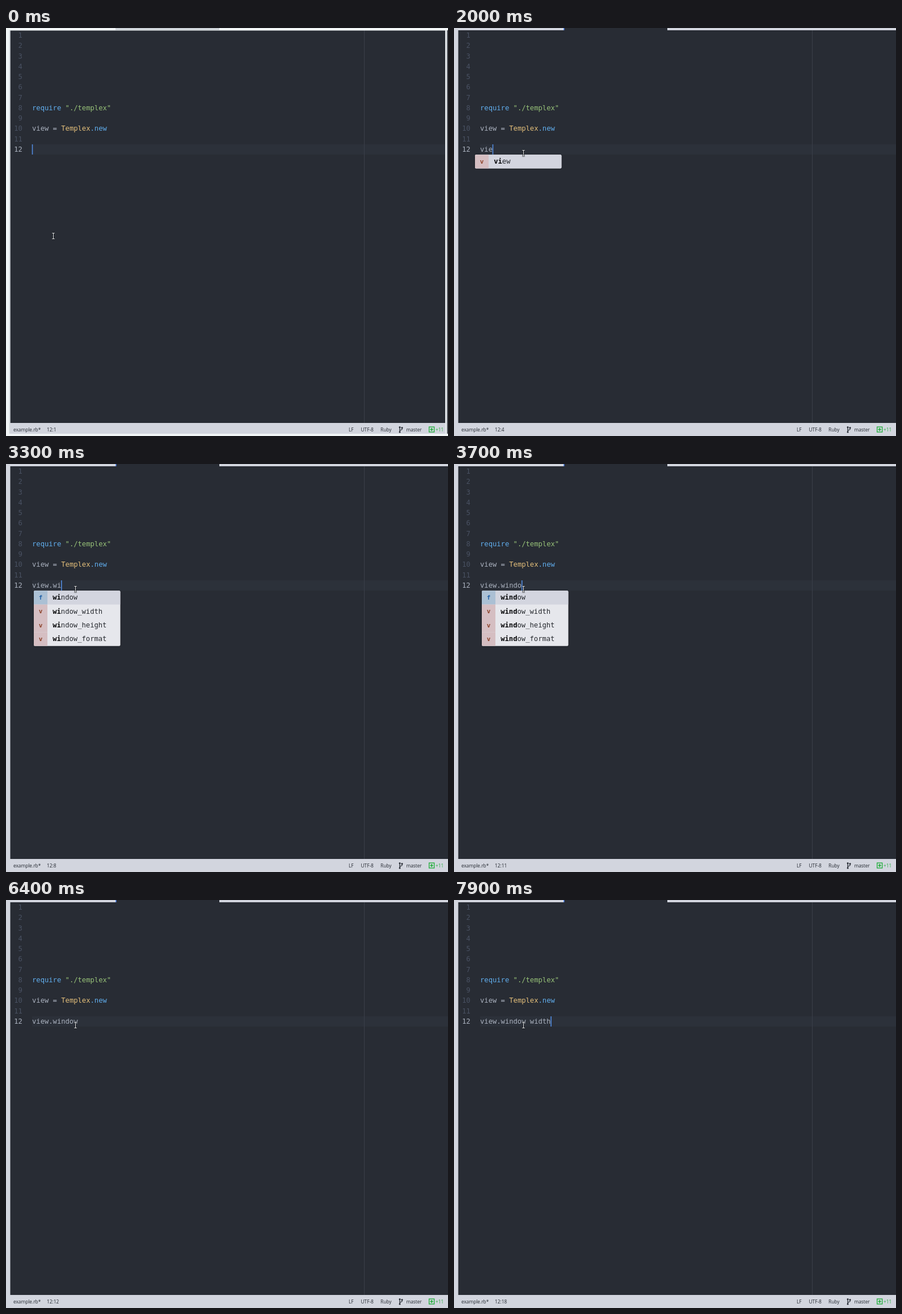
An HTML page with a canvas for the animation above (8 s loop, 779 by 719 pixels).

```html
<!DOCTYPE html>
<html lang="en">
<head>
<meta charset="utf-8">
<title>Editor typing</title>
<style>
html, body { margin: 0; width: 779px; height: 719px; overflow: hidden; background: #282c34; }
canvas { display: block; }
</style>
</head>
<body>
<canvas id="stage" width="779" height="719"></canvas>
<script>
const ctx = document.getElementById('stage').getContext('2d');
const LOOP = 8000, STEP = 100, LINE = 18.27, CHAR = 7.325, LEFT = 46, ROW = 24.4;
const MONO = '"DejaVu Sans Mono", monospace';
const CODE = `12.17px ${MONO}`, BOLD = `bold ${CODE}`;
const UI = '8.3px "Open Sans", "Noto Sans", sans-serif';
const PANEL = '#d2d5de', EDITOR = '#282c34', TEXT = '#abb2bf', BLUE = '#61afef';
const SENTENCE = 'view.window width';

// [time, characters typed]; a repeated count only restarts the caret blink
const KEYS = [
  [0, 0], [1700, 1], [1900, 2], [2000, 3], [2100, 4], [2300, 5],
  [3100, 6], [3200, 7], [3400, 8], [3500, 9], [3700, 10], [3800, 11], [3900, 11],
  [5700, 11], [6500, 12], [6900, 13], [7000, 14], [7100, 15], [7300, 16], [7600, 17]
];
const lastKey = t => KEYS.filter(k => k[0] <= t).pop() || KEYS[0];

function rect(x, y, w, h, color) {
  ctx.fillStyle = color;
  ctx.fillRect(x, y, w, h);
}

function text(str, x, y, color, font = CODE, align = 'left') {
  ctx.font = font;
  ctx.textAlign = align;
  ctx.fillStyle = color;
  ctx.fillText(str, x, y);
}

function line(points, color, width) {
  ctx.strokeStyle = color;
  ctx.lineWidth = width;
  ctx.beginPath();
  points.forEach(([x, y], i) => i ? ctx.lineTo(x, y) : ctx.moveTo(x, y));
  ctx.stroke();
}

const baseline = n => 218 - (12 - n) * LINE;

// parts: string, color, string, color ...
function codeLine(n, ...parts) {
  let col = 0;
  for (let i = 0; i < parts.length; i += 2) {
    text(parts[i], LEFT + col * CHAR, baseline(n), parts[i + 1]);
    col += parts[i].length;
  }
}

function drawEditor(count, caretOn) {
  rect(0, 0, 779, 719, EDITOR);
  rect(LEFT, 205, 733, 18, '#2c313a');
  rect(631, 4, 1, 692, '#3a3f49');
  for (let n = 1; n <= 12; n++) {
    text(n, 28.8, baseline(n), n === 12 ? TEXT : '#495162', CODE, 'right');
  }
  codeLine(8, 'require', BLUE, ' "./templex"', '#98c379');
  codeLine(10, 'view = ', TEXT, 'Templex', '#e5c07b', '.new', BLUE);
  codeLine(12, SENTENCE.slice(0, count), TEXT);
  if (caretOn) rect(LEFT + count * CHAR - 0.3, 205, 1.6, 18, '#528be0');
}

function drawChrome() {
  rect(0, 0, 193, 4, PANEL);
  rect(193, 0, 1.5, 4, '#568af2');
  rect(376, 0, 403, 4, PANEL);
  rect(0, 0, 7.5, 719, PANEL);
  rect(0, 696, 779, 23, PANEL);
}

function drawOldFrame(alpha) {
  if (alpha <= 0) return;
  ctx.globalAlpha = alpha;
  rect(0, 0, 779, 4.5, '#f1f5f6');
  rect(193, 0, 183, 3.5, '#ccd1d7');
  rect(0, 0, 7, 719, '#f1f5f6');
  rect(5.5, 4, 2, 711, '#d5dadd');
  rect(774, 4, 5, 715, '#e2e6ea');
  rect(777.5, 4, 1.5, 715, '#3a3e46');
  rect(0, 715, 779, 4, '#f1f5f6');
  ctx.globalAlpha = 1;
}

function drawStatus(count) {
  const ink = '#232830', green = '#2ab043';
  const label = (s, x, c = ink) => text(s, x, 710.8, c, UI);
  label('example.rb*', 13);
  label('12:' + (count + 1), 72);
  label('LF', 604);
  label('UTF-8', 625.5);
  label('Ruby', 660);
  label('master', 705.5);
  label('+11', 757, green);

  line([[694, 704], [694, 712]], ink, 1.3);
  line([[694, 709.5], [698, 707.5], [698, 704.5]], ink, 1.2);
  ctx.fillStyle = ink;
  for (const [x, y] of [[694, 703.5], [694, 712], [698, 704.5]]) {
    ctx.beginPath();
    ctx.arc(x, y, 1.5, 0, 7);
    ctx.fill();
  }
  ctx.strokeStyle = green;
  ctx.lineWidth = 1.4;
  ctx.strokeRect(745.7, 703, 9, 9);
  line([[747.6, 707.5], [752.8, 707.5]], green, 1.8);
  line([[750.2, 704.9], [750.2, 710.1]], green, 1.8);
}

function popup(x, width, rows, draw) {
  const y = 223.2, h = rows * ROW;
  ctx.save();
  ctx.shadowColor = 'rgba(0,0,0,.3)';
  ctx.shadowBlur = 3;
  ctx.fillStyle = '#e6e7ec';
  ctx.beginPath();
  ctx.roundRect(x, y, width, h, 2);
  ctx.fill();
  ctx.shadowColor = 'transparent';
  ctx.clip();
  rect(x, y, width, ROW, '#d3d5df');
  for (let i = 0; i < rows; i++) draw(i, y + i * ROW);
  ctx.restore();
}

function suggestion(word, matched, x, y) {
  [...word].forEach((c, i) => {
    const hit = matched(i);
    text(c, x + i * CHAR, y + 16, hit ? '#050608' : '#25282d', hit ? BOLD : CODE);
  });
}

function wordPopup(x, words, matched) {
  popup(x, 152.5, words.length, (i, y) => {
    const fn = words[i] === 'window';
    rect(x, y, 24, ROW, fn ? '#abc0d4' : '#d5bec2');
    text(fn ? 'f' : 'v', x + 12, y + 15.6, fn ? '#2463a8' : '#8d442c',
      `bold 11px ${MONO}`, 'center');
    suggestion(words[i], j => j < matched, x + 33.2, y);
  });
}

function whilePopup() {
  const x = 100.5;
  popup(x, 171.5, 1, (i, y) => {
    const green = '#35782f', mid = y + 12.3;
    rect(x, y, 24, ROW, '#b8c0b9');
    rect(x + 5.5, mid - 1.3, 5, 2.6, green);
    ctx.beginPath();
    ctx.moveTo(x + 9, mid - 4.2);
    ctx.lineTo(x + 14, mid);
    ctx.lineTo(x + 9, mid + 4.2);
    ctx.fill();
    rect(x + 15.5, mid - 3.8, 2.2, 7.6, green);
    suggestion('while', j => j === 0 || j === 2, x + 33.2, y);
    text('while ... end', x + 79.5, y + 16, '#74777f', `11px ${MONO}`);
  });
}

function drawPopups(t) {
  const typed = lastKey(t - STEP)[1];
  if (t >= 2000 && t < 2300) {
    wordPopup(37, ['view'], typed);
  } else if (t >= 3300 && t < 5600) {
    wordPopup(49, ['window', 'window_width', 'window_height', 'window_format'], typed - 5);
  } else if (t >= 7000 && t < 7200) {
    whilePopup();
  }
}

function drawPointer(t) {
  const p = Math.min(1, t / 600), e = p * p * (3 - 2 * p);
  const x = 83.5 + 39 * e, y = 366.5 - 146 * e;
  const beam = (color, width) => {
    line([[x, y - 5], [x, y + 5]], color, width);
    for (const end of [y - 5, y + 5]) line([[x - 2.2, end], [x + 2.2, end]], color, width);
  };
  beam('#15171b', 2.4);
  beam('#e4e6e9', 1);
}

function render(now) {
  const t = Math.floor((now % LOOP) / STEP) * STEP;
  const [since, count] = lastKey(t);
  const caretOn = Math.floor((t - since) / 400) % 2 === 0;
  drawEditor(count, caretOn);
  drawChrome();
  drawOldFrame(1 - t / 300);
  drawStatus(count);
  drawPopups(t);
  drawPointer(t);
}

const start = performance.now();
function tick() {
  render(performance.now() - start);
  requestAnimationFrame(tick);
}
tick();
</script>
</body>
</html>
```
